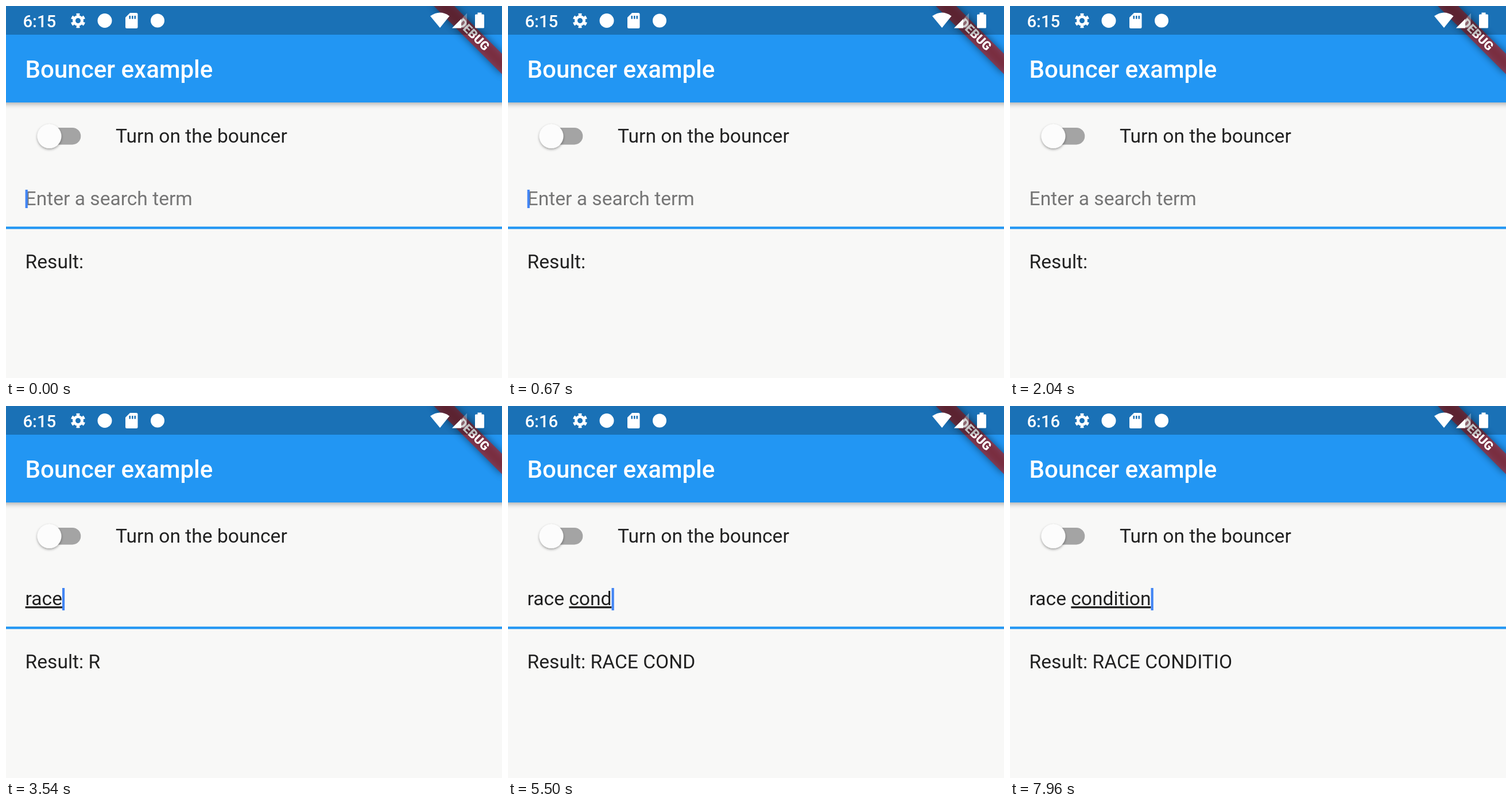
Recreate the animation shown at these times as an HTML page. Size 864x648 px, loop 8000 ms.

```html
<!DOCTYPE html>
<html lang="en">
<head>
<meta charset="utf-8">
<title>Bouncer example</title>
<style>
  html, body { margin: 0; width: 100%; height: 100%; overflow: hidden; background: #f8f8f7; }
  svg { display: block; width: 864px; height: 648px; }
  text { font: 400 33.6px Roboto, sans-serif; fill: #212121; white-space: pre; }
  #composing { text-decoration: underline; }
  #title { font-size: 42px; font-weight: 500; fill: #fff; }
  #clock { font-size: 29.4px; font-weight: 500; fill: #fff; }
  #debug { font-size: 21.4px; font-weight: 900; fill: #fff; text-anchor: middle; }
  #hint { fill: #757575; }
</style>
</head>
<body>
<svg viewBox="0 0 864 648">
  <defs>
    <filter id="blur" x="-30%" y="-100%" width="160%" height="300%"><feGaussianBlur stdDeviation="7"/></filter>
    <filter id="barShadow" x="-5%" y="-20%" width="110%" height="150%"><feDropShadow dx="0" dy="3" stdDeviation="4" flood-opacity=".3"/></filter>
    <filter id="knobShadow" x="-30%" y="-30%" width="160%" height="170%"><feDropShadow dx="0" dy="2" stdDeviation="2" flood-opacity=".38"/></filter>
  </defs>
  <rect width="864" height="648" fill="#f8f8f7"/>

  <!-- App bar -->
  <rect x="-20" y="-20" width="904" height="188" fill="#2196f3" filter="url(#barShadow)"/>
  <text id="title" x="33.6" y="125">Bouncer example</text>

  <!-- Switch -->
  <rect x="61" y="212" width="69.3" height="29.4" rx="14.7" fill="#a4a4a4"/>
  <circle cx="75.5" cy="226.8" r="21" fill="#fcfcfc" filter="url(#knobShadow)"/>
  <text x="191.1" y="238">Turn on the bouncer</text>

  <!-- Search field -->
  <text id="hint" x="33.6" y="347">Enter a search term</text>
  <text id="entry" x="33.6" y="347"><tspan id="committed"></tspan><tspan id="composing"></tspan></text>
  <rect id="cursor" width="4.2" fill="#4285f4"/>
  <rect y="384.3" width="864" height="4.2" fill="#2196f3"/>
  <text id="result" x="33.6" y="457"></text>

  <!-- Corner banner -->
  <g transform="translate(864 0) rotate(45)">
    <rect x="-84" y="58.8" width="168" height="25.2" fill="#000" opacity=".5" filter="url(#blur)"/>
    <rect x="-130" y="58.8" width="260" height="25.2" fill="#b71c1c" opacity=".627"/>
    <text id="debug" y="77.7">DEBUG</text>
  </g>

  <!-- Status bar -->
  <rect width="864" height="50" opacity=".25"/>
  <text id="clock" x="29.4" y="37"></text>
  <g fill="none" stroke="#fff" stroke-width="5">
    <circle cx="125.5" cy="25.5" r="7"/>
    <circle cx="125.5" cy="25.5" r="10.3" pathLength="12" stroke-dasharray="1" stroke-dashoffset="-.5"/>
  </g>
  <g fill="#fff">
    <circle cx="172" cy="25.5" r="12.5"/>
    <path fill-rule="evenodd" d="M216 12h11q2.5 0 2.5 2.5v22q0 2.5-2.5 2.5h-16.500q-2.5 0-2.5-2.5v-16.500zM214.500 17h2.500v5.500h-2.500zM219 17h2.500v5.500h-2.500zM223.500 17h2.500v5.500h-2.500z"/>
    <circle cx="264" cy="25.5" r="12"/>
    <path d="M739 17.500q17-12 33.500 0L756 38z"/>
    <path d="M777 38.500L803 12.500V38.500z" opacity=".3"/>
    <path d="M777 38.500L793 22.500V38.500z"/>
    <path d="M821.500 11.500h7v3h3q1.500 0 1.500 1.500v21q0 1.500-1.500 1.500h-13q-1.500 0-1.500-1.500v-21q0-1.500 1.500-1.500h3z"/>
  </g>
</svg>
<script>
const LOOP = 8000, BLINK = 500, FIRST_BLINK = 730, MINUTE_CHANGE = 4500;
const PHRASE = 'race condition';
const KEY_TIMES = [2500, 2800, 3080, 3370, 3830, 4210, 4460, 4790, 5130, 5590, 6000, 6380, 6800, 7500];
// Time of each answer and how many letters it covers
const ANSWERS = [[3330, 1], [3700, 2], [4080, 4], [4630, 6], [5040, 8], [5400, 9],
                 [6250, 10], [6710, 11], [7080, 12], [7590, 13]];
const [hint, entry, committed, composing, cursor, result, clock] =
  ['hint', 'entry', 'committed', 'composing', 'cursor', 'result', 'clock'].map(id => document.getElementById(id));

function cursorVisible(t, typed) {
  if (!typed) return t < FIRST_BLINK || Math.floor((t - FIRST_BLINK) / BLINK) % 2 === 1;
  return Math.floor((t - KEY_TIMES[typed - 1]) / BLINK) % 2 === 0;
}

function render(t) {
  const typed = KEY_TIMES.filter(time => time <= t).length;
  const text = PHRASE.slice(0, typed);
  const wordStart = text.lastIndexOf(' ') + 1;
  committed.textContent = text.slice(0, wordStart);
  composing.textContent = text.slice(wordStart);
  hint.style.display = typed ? 'none' : '';

  cursor.style.display = cursorVisible(t, typed) ? '' : 'none';
  cursor.setAttribute('x', 33.6 + (typed ? entry.getComputedTextLength() : 0));
  cursor.setAttribute('y', typed ? 317 : 320);
  cursor.setAttribute('height', typed ? 39 : 32);

  const answer = ANSWERS.filter(([time]) => time <= t).pop();
  result.textContent = 'Result: ' + PHRASE.slice(0, answer ? answer[1] : 0).toUpperCase();
  clock.textContent = t < MINUTE_CHANGE ? '6:15' : '6:16';
}

const start = performance.now();
function tick() {
  render((performance.now() - start) % LOOP);
  requestAnimationFrame(tick);
}
tick();
</script>
</body>
</html>
```
